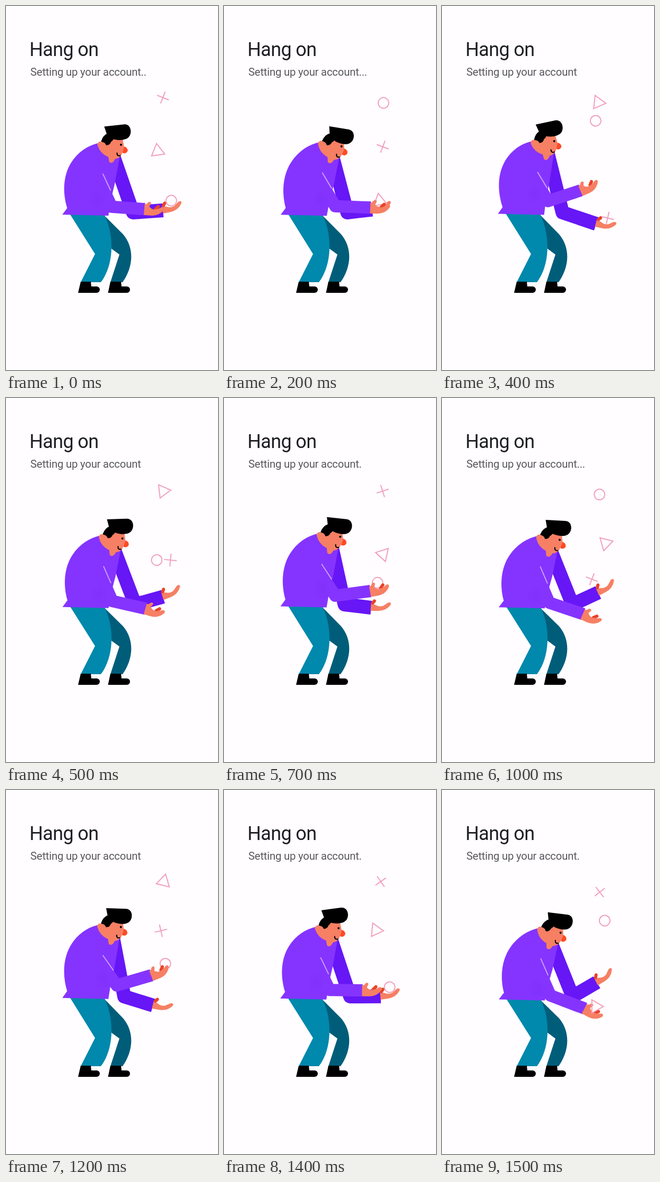
Recreate the animation shown at these times as an HTML page. Size 400x684 px, loop 1.6 s.

```html
<!DOCTYPE html>
<html lang="en">
<head>
<meta charset="utf-8">
<title>Hang on</title>
<style>
  html, body { margin: 0; width: 100%; height: 100%; overflow: hidden; background: #fffdff; }
  svg { display: block; width: 100vw; height: 100vh; }
  text { font-family: Roboto, sans-serif; }
  .arm { fill: none; stroke-linejoin: round; }
  .toy { fill: none; stroke: #f2a0bc; stroke-width: 2; }
  .skin { fill: #f67f64; }
  .tip { fill: none; stroke: #e8432a; stroke-width: 6; stroke-linecap: round; }
</style>
</head>
<body>
<svg viewBox="0 0 400 684">
  <defs>
    <radialGradient id="fold">
      <stop offset="0" stop-color="#6a20e0" stop-opacity=".18"/>
      <stop offset="1" stop-color="#6a20e0" stop-opacity="0"/>
    </radialGradient>
  </defs>
  <text x="44.300" y="94" font-size="36" letter-spacing="-.65" fill="#1f1f24">Hang on</text>
  <text id="status" x="46" y="131" font-size="20.300" letter-spacing="-.2" fill="#57575d"></text>

  <path id="legFar" fill="#005d7a"/>
  <path id="legNear" fill="#0088ad"/>
  <path d="M141 518H160L161 527H171A6 6 0 0 1 171 539H136Z"/>
  <path d="M197 518H217L218 527H228A6 6 0 0 1 228 539H192.500Z"/>

  <path id="armFar" class="arm" stroke="#6716f6" stroke-width="26"/>
  <g id="handFar">
    <path class="skin" d="M-1-8L7-6Q14-2 22-5L31-12Q38-14 36-8Q28 4 14 5L-1 6Z"/>
    <path class="tip" d="M2-9L5-13"/>
  </g>
  <path id="torso" fill="#8534ff"/>
  <g id="head">
    <path class="skin" d="M171 261Q176 276 192 282L194 291Q199 295 203 289L205 285Q213 284 217 276L221 262L217 244H190Z"/>
    <path d="M177 254Q180 241 190 237L202 244Q199 252 196 253Q194 260 187 260Q185 254 177 254Z"/>
    <circle class="skin" cx="176" cy="259" r="5.500"/>
    <path fill="#ff4a24" d="M221 261Q228 263 228 269Q225 276 218 273Z"/>
    <circle cx="215" cy="258" r="2"/>
    <path d="M208 273Q208 281 215 278" fill="none" stroke="#000" stroke-width="2"/>
    <path id="quiff" d="M182 225L219 219.500C231 218 235 232 231 240C227 249 214 250 205 249C196 248 190 243 187 238Z"/>
  </g>
  <g id="toys" class="toy">
    <path d="M-12 0H12M0-12V12"/>
    <circle r="10"/>
    <path d="M14.500 0L-7.250 12.560V-12.560Z"/>
  </g>
  <g id="near">
    <path id="armNear" class="arm" stroke="#8534ff" stroke-width="23"/>
    <ellipse id="shade" rx="18" ry="20" fill="url(#fold)"/>
    <path id="crease" stroke="#cda6ff" stroke-width="1.800"/>
    <g id="handNear">
      <path class="tip" d="M20-2L25-7"/>
      <path class="skin" d="M-1-9L3-10Q7-17 11-13Q11-10 8-6Q11-2 16-1Q24-1 31-6Q37-8 36-2Q28 11 12 11H-1Z"/>
    </g>
  </g>
</svg>
<script>
const LOOP = 1600, STEP = 100;
const CYCLE = 470, BEAT = CYCLE / 2;   // one full body swing, one throw per beat
const DIP = 317;                       // phase at which a hand is lowest
const $ = id => document.getElementById(id);
const set = (el, name, value) => el.setAttribute(name, value);
const place = (x, y, deg) => `translate(${x} ${y}) rotate(${deg})`;
const toys = [...$("toys").children];

// swings around mid and is farthest out at phase top
const wave = (p, mid, amp, top) => mid + amp * Math.cos(2 * Math.PI * (p - top) / CYCLE);

const bodyPose = p => ({
  x: wave(p, 179, 7, 348),
  y: wave(p, 258.7, 3.6, 305),
  tilt: wave(p, 4, 7.5, 355),
  flop: wave(p, 4, 5, 410)
});

const nearPose = p => ({
  elbow: [wave(p, 204.5, 5.5, 430), wave(p, 374, 12, DIP)],
  wrist: [wave(p, 269, 8, 420), wave(p, 371, 40, DIP)],
  turn: wave(p, -4, 32, DIP)
});

const farPose = p => ({
  elbow: [wave(p, 233, 13.5, 65), 388],
  wrist: [wave(p, 287, 9.5, 0), wave(p, 390, 29, DIP + 5)],
  turn: wave(p, -1, 26, DIP)
});

function rotate(x, y, deg) {
  const r = deg * Math.PI / 180, c = Math.cos(r), s = Math.sin(r);
  return [x * c - y * s, x * s + y * c];
}

function held(arm, x, y) {
  const [dx, dy] = rotate(x, y, arm.turn);
  return [arm.wrist[0] + dx, arm.wrist[1] + dy];
}

// even throws leave the near hand, odd throws leave the far hand
function toyAt(id, t, near, far) {
  for (let k = id - 3; ; k += 3) {
    const odd = k % 2 !== 0, d = t - BEAT * k;
    if (d > 300) continue;
    if (d < -228) return odd ? held(far, 18, -16) : held(near, 16, -13);
    return odd
      ? [299 - 0.055 * d, 172 + 0.0024 * (d - 30) ** 2]
      : [296 + 0.018 * d, 172 + 0.0022 * (d + 5) ** 2];
  }
}

// slow start, fast middle, slow end
const ease = u => Math.sin(Math.PI / 2 * u ** 1.4) ** 2;
const spin = (id, t) => 22 - [150, 0, 262][id] * ease(t / 1500);

// the dots fill up 0 to 3, the full set lingers
const dots = t => Math.max(0, Math.floor((t + 500) % 800 / 200 - 0.01) + 0) % 4;

function draw(t) {
  const q = (t + 220) % CYCLE;
  const { x, y, tilt, flop } = bodyPose(q);
  const near = nearPose(q), far = farPose(q + BEAT);
  const dx = x - 176, dy = y - 259;
  const hx = 0.12 * dx, hy = 0.3 * dy + 0.1 * dx;

  // follows the hip low down and the shoulders high up
  const bend = (px, py) => {
    const w = Math.max(0, Math.min(1, (392 - py) / 130));
    return `${px + hx + (dx - hx) * w} ${py + hy + (dy - hy) * w} `;
  };
  const hip = (px, py) => `${px + hx} ${py + hy} `;

  $("status").textContent = "Setting up your account" + ".".repeat(dots(t));

  set($("legFar"), "d", `M${hip(184, 391)}L${hip(186, 394)}L221 429C243 455 240 491 220 519H197L214 467L199 456L${hip(180, 391)}Z`);
  set($("legNear"), "d", `M${hip(120, 390)}L168 466L141 519H179C204 487 205 430 ${hip(185, 391)}Z`);

  const [cx, cy] = rotate(38, 18, tilt), sx = x + cx, sy = y + cy;
  set($("armFar"), "d", `M${sx - 12} ${sy + 4}L${far.elbow}L${far.wrist}`);
  set($("handFar"), "transform", place(...far.wrist, far.turn));

  set($("torso"), "d", `M${bend(106, 391.5)}L${bend(115, 379)}` +
    `C${bend(106, 351)}${bend(106, 318)}${bend(121.5, 293)}` +
    `C${bend(134, 273)}${bend(153, 260)}${bend(174, 256)}` +
    `L${sx} ${sy}L${bend(204, 334)}L${bend(198, 360)}L${bend(193, 393.5)}Z`);

  set($("head"), "transform", place(x, y, tilt) + " translate(-176 -259)");
  set($("quiff"), "transform", `rotate(${flop} 190 252)`);

  const ax = 168 + dx / 2, ay = 312 + dy / 2;
  const [ex, ey] = near.elbow;
  const len = Math.hypot(ex - ax, ey - ay);
  const ux = (ex - ax) / len, uy = (ey - ay) / len;
  const edge = s => `${ax + uy * 11.3 + ux * s} ${ay - ux * 11.3 + uy * s} `;
  set($("armNear"), "d", `M${ax} ${ay}L${near.elbow}L${near.wrist}`);
  set($("crease"), "d", `M${edge(8)}L${edge(43)}`);
  set($("shade"), "transform", `translate(${ex - 26} ${ey - 13})`);
  set($("handNear"), "transform", place(...near.wrist, near.turn));

  toys.forEach((el, id) => set(el, "transform", place(...toyAt(id, t, near, far), spin(id, t))));
  // a fresh catch rests on top of the near palm
  const onTop = q > 270 && q < 390;
  $("near").parentNode.insertBefore($("toys"), onTop ? null : $("near"));
}

const start = performance.now();
function tick() {
  const t = (performance.now() - start) % LOOP;
  draw(Math.floor(t / STEP) * STEP);
  requestAnimationFrame(tick);
}
tick();
</script>
</body>
</html>
```
